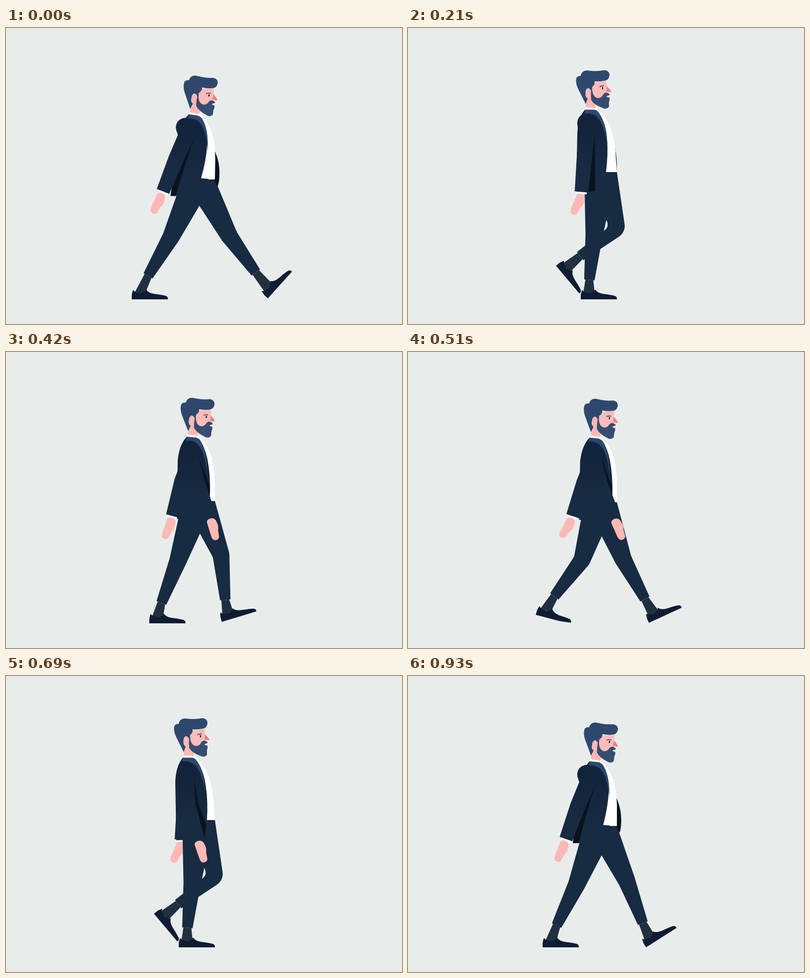
Write an HTML page with a canvas that moves like this. It is 800 px wide and 600 px high and loops after 960 ms.

```html
<!DOCTYPE html>
<html lang="en">
<head>
<meta charset="utf-8">
<title>Walk cycle</title>
<style>
  html, body { margin: 0; width: 100%; height: 100%; overflow: hidden; background: #e8edec; }
  canvas { display: block; }
</style>
</head>
<body>
<canvas id="stage" width="800" height="600"></canvas>
<script>
const ctx = document.getElementById('stage').getContext('2d');
const LOOP = 960, STEP = 480, TICK = 30, RAD = Math.PI / 180;

const C = {
  bg: '#e8edec', cloth: '#172b42', clothTop: '#11223a', shade: '#0a131d',
  lapel: '#2d486f', hair: '#2e486d', beard: '#364c70', skin: '#ffb8b6',
  face: '#fcbcba', nose: '#f57d79', sock: '#21303f', shoe: '#0f1c34', white: '#ffffff'
};

// Key poses of one step; a limb runs through two steps per loop.
const TIMES = [0, 90, 210, 330, 420, 450, 480];

const leg = {
  heelX: [254, 268, 299, 346, 436, 481, 529, 419, 349, 327, 289.5, 272, 254],
  heelY: [550, 506, 482, 507, 547, 550, 548, 550, 550, 550, 550, 550, 550],
  tilt:  [0, 36, 50, 26, -17, -32.6, -48, 0, 0, 0, 0, 0, 0],
  flex:  [0, 14, 0, 0, 0, 0, 0, 0, 0, 0, 0, 0, 0],
  kneeX: [333, 380, 420, 425, 434, 442, 451, 408, 376, 367, 347, 340, 333],
  kneeY: [424, 419, 407, 401, 412, 416, 422, 420, 420, 421, 424, 424, 424]
};
const arm = {
  upper: [-26, -20, -7, 4, 13, 14, 14, 11, 2, -16.5, -23, -25, -26],
  lower: [-21.7, -13, -5, 10, 20, 21, 22, 23, 16, -3, -15, -19.5, -21.7],
  hand:  [-24, -35, -23, -3, 17, 19, 21, 27, 19, 0, -19, -21, -24]
};
const body = {
  hip:  [307, 300, 292, 295, 302, 304, 307],
  lean: [5.1, 2.4, 0, 0.9, 3.5, 4.2, 5.1],
  turn: [-1, -0.93, -0.33, 0.5, 0.92, 0.97, 1]
};

// Monotone cubic through the keys, free to break direction at each contact.
function at(keys, t) {
  const off = keys.length > 7 && t >= STEP ? 6 : 0;
  const x = t % STEP, v = k => keys[off + k];
  const gap = k => TIMES[k + 1] - TIMES[k];
  const sec = k => (v(k + 1) - v(k)) / gap(k);
  const inner = k => {
    const a = sec(k - 1), b = sec(k);
    if (a * b <= 0) return 0;
    const p = 2 * gap(k) + gap(k - 1), q = gap(k) + 2 * gap(k - 1);
    return (p + q) / (p / a + q / b);
  };
  const slope = k => k === 0 ? 1.5 * sec(0) - 0.5 * inner(1)
                   : k === 6 ? 1.5 * sec(5) - 0.5 * inner(5) : inner(k);
  let i = 0;
  while (i < 5 && x >= TIMES[i + 1]) i++;
  const h = gap(i), u = (x - TIMES[i]) / h, w = 1 - u;
  return v(i) * w * w * (1 + 2 * u) + v(i + 1) * u * u * (3 - 2 * u)
       + h * u * w * (slope(i) * w - slope(i + 1) * u);
}

function pose(track, t) {
  const p = {};
  for (const k in track) p[k] = at(track[k], t);
  return p;
}

const add = (p, q, k = 1) => [p[0] + q[0] * k, p[1] + q[1] * k];
const unit = (p, q) => {
  const d = add(q, p, -1), n = Math.hypot(d[0], d[1]);
  return [d[0] / n, d[1] / n];
};
const swing = deg => [Math.sin(deg * RAD), Math.cos(deg * RAD)];
const side = d => [d[1], -d[0]];
const spin = ([x, y], a) => [x * Math.cos(a) - y * Math.sin(a), x * Math.sin(a) + y * Math.cos(a)];
const mid = (a, b) => unit([0, 0], add(a, b));

function poly(color, ...pts) {
  ctx.fillStyle = color;
  ctx.beginPath();
  pts.forEach(p => ctx.lineTo(p[0], p[1]));
  ctx.fill();
}
function fill(color, d) {
  ctx.fillStyle = color;
  ctx.fill(new Path2D(d));
}

function drawShoe(put) {
  const go = (...p) => ctx.lineTo(...put(...p));
  const bow = (a, b, c, d) => ctx.quadraticCurveTo(...put(a, b), ...put(c, d));
  ctx.fillStyle = C.shoe;
  ctx.beginPath();
  go(0, 0); go(0, -8);
  bow(1, -16, 3, -19);
  bow(7, -13, 17, -13);
  bow(26, -14, 29, -20);
  bow(33, -13, 46, -11);
  bow(62, -9, 69, -7);
  bow(74, -5, 73, 0);
  go(50, 0);
  ctx.fill();
}

function drawLeg(t, hipY) {
  const p = pose(leg, t);
  const put = (x, y) => {
    let q = [x, y];
    if (x > 50) q = add([50, 0], spin([x - 50, y], -p.flex * RAD));
    return add([p.heelX, p.heelY], spin(q, p.tilt * RAD));
  };
  const knee = [p.kneeX, p.kneeY];
  const thigh = unit([389, hipY], knee), shin = unit(knee, put(15, -17));
  const n = side(mid(thigh, shin)), across = side(shin);
  const bend = Math.acos(Math.min(1, thigh[0] * shin[0] + thigh[1] * shin[1]));
  const front = add(knee, n, 17.5 / Math.cos(bend / 2));
  const back = add(knee, n, -(17.5 - 3 * bend));
  const cuff = add(knee, shin, 91);
  const cuffF = add(cuff, across, 10.5), cuffB = add(cuff, across, -10.5);

  poly(C.sock, add(cuff, across, 8), add(cuff, across, -8), put(5, -12), put(28, -14));
  drawShoe(put);

  ctx.fillStyle = C.cloth;
  ctx.beginPath();
  ctx.moveTo(422, hipY);
  ctx.arcTo(...front, ...cuffF, 26);
  ctx.lineTo(...cuffF);
  ctx.lineTo(...cuffB);
  ctx.arcTo(...back, 356, hipY, 14);
  ctx.lineTo(356, hipY);
  ctx.fill();
}

function armJoints(t, s) {
  const p = pose(arm, t);
  const d1 = swing(p.upper), d2 = swing(p.lower);
  const n1 = side(d1), n2 = side(d2), ne = side(mid(d1, d2));
  const elbow = add(s, d1, 70), cuff = add(elbow, d2, 71);
  return {
    p, s, d2, n2, cuff,
    top: add(add(s, d1, 14), n1, 14), back: add(s, n1, -19),
    elbowF: add(elbow, ne, 15.5), elbowB: add(elbow, ne, -15.5),
    cuffF: add(cuff, n2, 13.5), cuffB: add(cuff, n2, -13.5)
  };
}

function drawArm(a, cloth) {
  const strip = Math.max(0, Math.min(4, 4 - a.p.lower * 0.25));
  poly(C.white, add(a.cuff, a.n2, 11), add(a.cuff, a.n2, -11),
    add(add(a.cuff, a.n2, -11), a.d2, strip), add(add(a.cuff, a.n2, 11), a.d2, strip));

  ctx.save();
  ctx.translate(...add(a.cuff, a.d2, 9));
  ctx.rotate(-a.p.hand * RAD);
  fill(C.skin, 'M-9 1Q-8 -5 0 -5Q10 -4 10 6Q12 15 8 22L6 36Q3 42 -4 40Q-9 38 -9 30Z');
  ctx.restore();

  poly(cloth, a.top, a.elbowF, a.cuffF, a.cuffB, a.elbowB, a.back, a.s);
  ctx.beginPath();
  ctx.arc(...a.s, 19, 0, 7);
  ctx.fill();
}

function drawHead() {
  fill(C.skin, 'M360 136L371 128L380 150L378 164L359 162Z');
  fill(C.face, 'M371 112Q388 108 401 107L403 133L403 150L378 152L370 140Z');
  fill(C.nose, 'M402 118L411 128Q411 130 408 130L401 129Z');
  fill(C.hair, 'M359 154L343 122Q338 110 340 102Q342 97 349 97Q350 87 361 86L372 87' +
    'Q385 88 396 85.5Q407 86 407 96Q406 106 396 107Q385 109 377 108Q378 116 371 120' +
    'L370 126Q360 122 359 130Q357 140 363 143Z');
  fill(C.beard, 'M370 119L372 118Q371 140 384 142Q391 142 394 135Q399 128 406 133' +
    'Q409 136 404 137Q399 138 402 140L407 141Q408 146 406 150L406 160' +
    'Q400 166 393 162Q376 156 370 146Q369 130 370 119Z');
  ctx.fillStyle = C.skin;
  ctx.beginPath();
  ctx.ellipse(364, 130.5, 5.5, 8.5, 0, 0, 7);
  ctx.fill();
  ctx.fillStyle = '#10151f';
  ctx.beginPath();
  ctx.ellipse(393, 122, 1.3, 2.6, 0, 0, 7);
  ctx.fill();
  ctx.strokeStyle = C.hair;
  ctx.lineWidth = 1.6;
  ctx.stroke(new Path2D('M386.5 119.5Q390 117 396 117.5'));
}

function draw(t) {
  const b = pose({ hip: body.hip, lean: body.lean }, t);
  const lean = b.lean * RAD;
  const turn = at(body.turn, t) * (t < STEP ? 1 : -1);
  const d = 9 * turn;
  const shoulder = x => add([422, b.hip], spin([x - 422, -100], lean));
  const inBody = fn => {
    ctx.save();
    ctx.translate(422, b.hip);
    ctx.rotate(lean);
    ctx.translate(-422, -292);
    fn();
    ctx.restore();
  };
  const cloth = ctx.createLinearGradient(0, 170, 0, 290);
  cloth.addColorStop(0, C.clothTop);
  cloth.addColorStop(1, C.cloth);

  const far = armJoints((t + STEP) % LOOP, shoulder(365 + 12 * turn));
  const near = armJoints(t, shoulder(365));
  const jacket = new Path2D(`M357 165L378 164C392 176 401 200 ${403 + d * 0.3} 225` +
    `Q${406.5 + d * 0.6} 255 ${403 + d} 292L${398 + d} 330L${342 + d * 0.7} 333L342 215Q343 183 357 166Z`);

  ctx.fillStyle = C.bg;
  ctx.fillRect(0, 0, 800, 600);

  drawArm(far, cloth);
  drawLeg(t, b.hip);
  drawLeg((t + STEP) % LOOP, b.hip);

  inBody(() => {
    const e = Math.max(0, -turn * 13 - 3.5);
    if (e) fill(C.shade, `M415 232Q${422 + e * 0.8} 256 ${421 + e} 285` +
      `Q${421.5 + e} 300 ${421 + e * 0.8} ${292 + e * 1.5}L420 292Z`);
    fill(C.white, 'M358 160L379 162Q396 173 408 199Q416 220 419 250L422 292L390 292L370 180L357 166Z');
    ctx.fillStyle = cloth;
    ctx.fill(jacket);
  });

  // Shadow of the near sleeve, kept on the jacket.
  ctx.save();
  const plain = ctx.getTransform();
  ctx.translate(422, b.hip);
  ctx.rotate(lean);
  ctx.translate(-422, -292);
  ctx.clip(jacket);
  ctx.setTransform(plain);
  const hem = add(near.cuffF, near.d2, 14);
  poly(C.shade, near.top, near.elbowF, near.cuffF, hem, add(hem, [14, 0]),
    add(near.cuffF, [14, 0]), add(near.elbowF, [6, 0]));
  ctx.restore();

  drawArm(near, cloth);

  inBody(() => {
    fill(C.lapel, 'M357 165L378 164C392 176 401 200 403 238Q399 210 390 192Q381 176 370 174Q362 172 357 174Z');
    ctx.translate(366, 164);
    ctx.rotate(lean * 0.55);
    ctx.translate(-366, -164);
    drawHead();
    fill(C.white, 'M358 161L379 162Q386 167 391 174Q383 167 376 165.5L357 165.5Z');
  });
}

const start = performance.now();
function frame() {
  const t = (performance.now() - start) % LOOP;
  draw(Math.floor(t / TICK) * TICK);
  requestAnimationFrame(frame);
}
frame();
</script>
</body>
</html>
```
